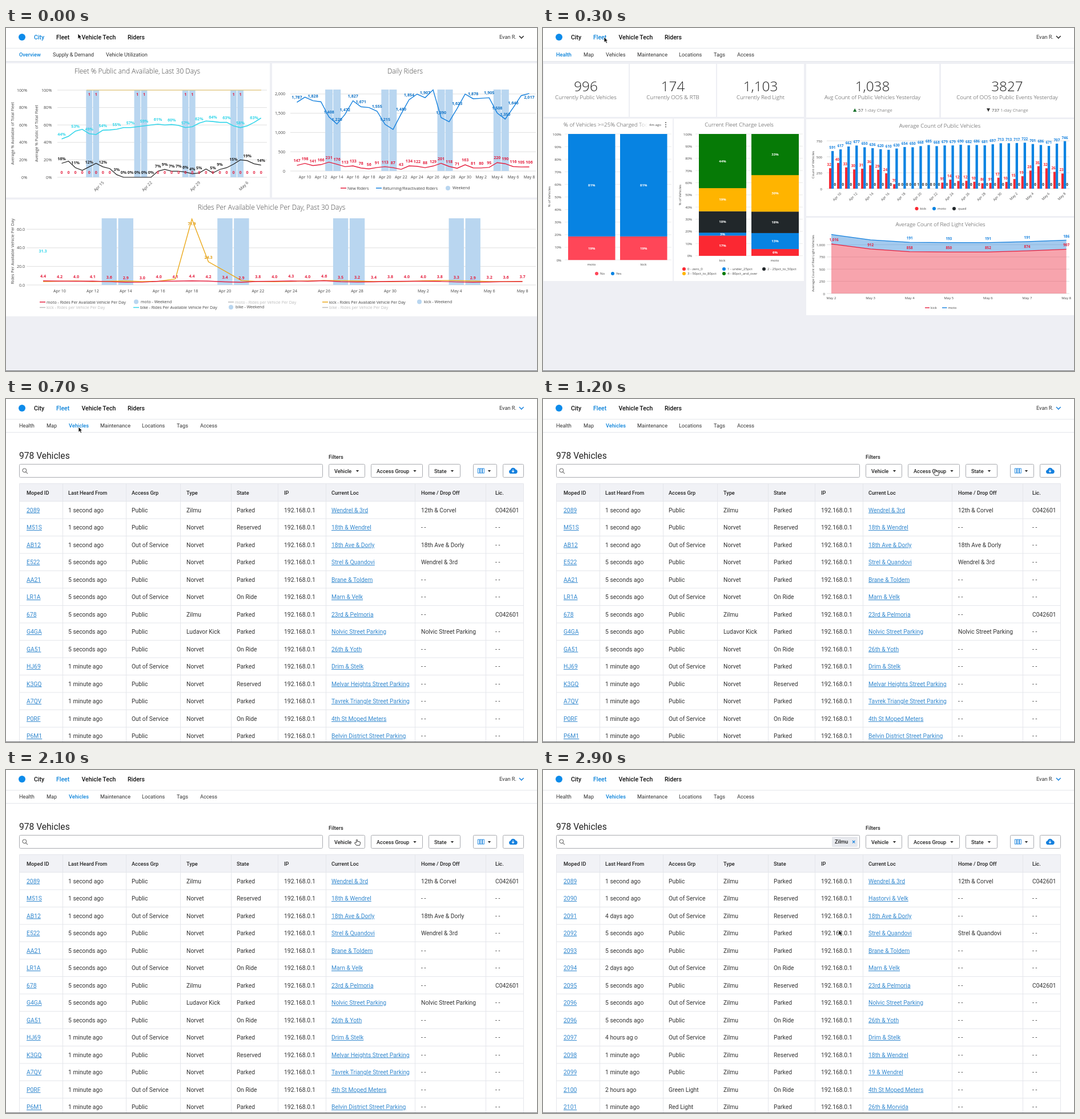
Recreate the animation shown at these times as an HTML page. Size 930x602 px, loop 3000 ms.

```html
<!DOCTYPE html>
<html lang="en">
<head>
<meta charset="utf-8">
<title>Fleet dashboard</title>
<style>
html, body { margin: 0; width: 100%; height: 100%; overflow: hidden; background: #fff; }
svg { display: block; width: 930px; height: 602px; }
text { font: 7.1px "Open Sans", sans-serif; fill: #444; white-space: pre; }
.small text { font-size: 6px; }
text.mid { text-anchor: middle; }
text.end { text-anchor: end; }
text.bold { font-weight: 700; }
text.title { font-size: 11.9px; font-weight: 300; fill: #444; }
.small text.title { font-size: 9.8px; }
.small text.big { font-size: 24.3px; font-weight: 300; fill: #222; }
.small text.delta { font-size: 7.7px; }
.small text.val { font-size: 6.3px; font-weight: 700; }
.ui text { font: 9.2px Roboto, sans-serif; fill: #333; }
.ui text.nav { font-size: 10.5px; font-weight: 500; fill: #111; }
.ui text.med { font-weight: 500; fill: #222; }
.ui text.on { font-weight: 500; fill: #0d84da; }
.ui text.cell { font-size: 10.35px; }
.ui text.link { fill: #3489cf; text-decoration: underline; }
.ui text.count { font-size: 15.6px; fill: #222; }
.city, .fleet, .table, .all, .only, .groups, .types { animation: 3s step-end infinite; }
.city { animation-name: city; }
.fleet { animation-name: fleet; }
.table { animation-name: table; }
.all { animation-name: all; }
.only { animation-name: only; }
.groups { animation-name: groups; }
.types { animation-name: types; }
@keyframes city { 0% { opacity: 1 } 10%, 100% { opacity: 0 } }
@keyframes fleet { 0% { opacity: 0 } 10% { opacity: 1 } 23.333%, 100% { opacity: 0 } }
@keyframes table { 0% { opacity: 0 } 23.333%, 100% { opacity: 1 } }
@keyframes all { 0% { opacity: 1 } 83.333%, 100% { opacity: 0 } }
@keyframes only { 0% { opacity: 0 } 83.333%, 100% { opacity: 1 } }
@keyframes groups { 0% { opacity: 0 } 50% { opacity: .95 } 53.333% { opacity: 1 } 66.667%, 100% { opacity: 0 } }
@keyframes types { 0% { opacity: 0 } 73.333% { opacity: .95 } 76.667% { opacity: 1 } 83.333%, 100% { opacity: 0 } }
</style>
</head>
<body>
<svg id="stage" viewBox="0 0 930 602"></svg>
<script>
const BLUE = '#1480de', RED = '#e5203f', CYAN = '#35d6ea', GOLD = '#eba91c', SHADE = '#b9d6f0', GREY = '#bbb';
const BAR = { red: '#fb2832', blue: '#0783e2', black: '#21272a', gold: '#ffb400', green: '#067a06' };

const esc = s => String(s).replace(/&/g, '&amp;').replace(/</g, '&lt;').replace(/>/g, '&gt;');
const text = (x, y, s, cls = '', fill = '') =>
  `<text x="${x}" y="${y}" class="${cls}"${fill && ` style="fill:${fill}"`}>${esc(s)}</text>`;
const turned = (x, y, s, angle, cls) =>
  `<text transform="translate(${x} ${y}) rotate(${angle})" class="${cls}">${esc(s)}</text>`;
const rect = (x, y, w, h, fill, more = '') => `<rect x="${x}" y="${y}" width="${w}" height="${h}" fill="${fill}" ${more}/>`;
const path = (d, stroke, width = 1, fill = 'none') => `<path d="${d}" stroke="${stroke}" stroke-width="${width}" fill="${fill}"/>`;
const dot = (x, y, r, fill) => `<circle cx="${x}" cy="${y}" r="${r}" fill="${fill}"/>`;
const each = (list, fn) => list.map(fn).join('');
const group = (cls, body) => `<g class="${cls}">${body}</g>`;
const plot = points => 'M' + points.map(p => p.map(n => n.toFixed(1)).join(' ')).join('L');

// A linear chart frame: px(index) and py(value).
const scale = (x0, dx, y0, k) => ({ px: i => x0 + i * dx, py: v => y0 - v * k });
const series = (c, values, color, width = 1.4) => path(plot(values.map((v, i) => [c.px(i), c.py(v)])), color, width);
const grid = (x1, x2, base, step, labels, right, color = '#d9d9d9') => each(labels, (s, i) => {
  const y = base - i * step;
  return path(`M${x1} ${y}H${x2}`, color, .8) + text(right, y + 2.5, s, 'end');
});
const weekends = (c, half, top, bottom) => each([4, 5, 11, 12, 18, 19, 25, 26], i =>
  rect(c.px(i) - half, top, half * 2, bottom - top, SHADE));
const dayName = i => i < 22 ? `Apr ${i + 9}` : `May ${i - 21}`;
const evenDays = Array.from({ length: 15 }, (_, i) => 2 * i + 1);
const percents = step => Array.from({ length: 100 / step + 1 }, (_, i) => i * step + '%');
const lineKey = (x, y, s, color, ink = '') => path(`M${x} ${y}h10`, color, 1.5) + text(x + 12, y + 2.5, s, '', ink);
const dotKey = (x, y, s, color, r = 3, gap = 6) => dot(x, y, r, color) + text(x + gap, y + 2.4, s);

const FLEET_TABS = [[23, 'Health'], [71, 'Map'], [110, 'Vehicles'], [165, 'Maintenance'], [238, 'Locations'], [299, 'Tags'], [340, 'Access']];
const CITY_TABS = [[23, 'Overview'], [82, 'Supply & Demand'], [175, 'Vehicle Utilization']];

function header(page, tabs, tab, arrow) {
  return group('ui', rect(0, 0, 930, 58, '#fff') + path('M0 35.5H930M0 58.5H930', '#e4e6ea') +
    dot(28, 16, 6, '#0d8bea') +
    each([[49, 'City'], [88, 'Fleet'], [132.5, 'Vehicle Tech'], [213, 'Riders']], ([x, s]) =>
      text(x, 19.7, s, 'nav', s === page ? '#0d84da' : '')) +
    text(864, 19.3, 'Evan R.') + path('M899 14l3.8 4 3.8-4', arrow, 1.5) +
    each(tabs, ([x, s]) => text(x, 50.2, s, s === tab ? 'on' : '')));
}

function cityPage() {
  const cards = rect(0, 58, 930, 544, '#eeeff4') +
    rect(0, 62, 462, 235.5, '#fff') + rect(466, 62, 464, 235.5, '#fff') + rect(0, 301, 930, 205, '#fff');

  const a = scale(97.5, 12.04, 262, 1.53);
  const open = [44, 47, 53, 55, 50, 49, 54, 54.3, 55, 57, 57, 58, 59, 60, 61, 60, 60.5, 59.5, 57, 58, 62, 64.5, 64, 63, 63, 59, 57, 59, 63, 68];
  const openTags = [44, 53, 49, 54, 55, 57, 59, 61, 60, 57, 62, 64, 63, 58, 63];
  const idle = [16, 18.5, 11, 8, 12, 16, 12, 10, 3, 0, 0, 0, 0, 0, 7, 9, 7, 7, 6, 4, 5, 9.5, 5, 9, 11, 15, 20, 19, 15.5, 14];
  const untagged = [1, 3, 5, 7, 21, 24, 26, 28];
  const share = text(230, 79.5, 'Fleet % Public and Available, Last 30 Days', 'title mid') +
    grid(90, 457, 262, 30.6, percents(20), 80) + each(percents(20), (s, i) => text(37, 264.5 - i * 30.6, s, 'end')) +
    weekends(a, 5.4, 109, 262) + path('M141 109H447', '#e6c25e', 1.2) +
    series(a, open, CYAN, 1.6) + series(a, idle, '#222', 1.2) +
    each([4, 5, 11, 12, 18, 19, 25, 26], i => text(a.px(i), 119, 1, 'mid bold', RED)) +
    each(idle, (v, i) => i < 8 || i > 13 ? text(a.px(i), 256, 0, 'mid bold', RED) : '') +
    each(openTags, (v, i) => text(a.px(2 * i), a.py(open[2 * i]) - 5.5, v + '%', 'mid bold', CYAN)) +
    each(idle, (v, i) => untagged.includes(i) ? '' : text(a.px(i), a.py(v) - 6, Math.round(v) + '%', 'mid bold', '#222')) +
    each(['Apr 15', 'Apr 22', 'Apr 29', 'May 6'], (s, i) => turned(172 + i * 84.3, 272, s, -45, 'end')) +
    turned(13.5, 185, 'Average % Available of Total Fleet', -90, 'mid') +
    turned(56, 185, 'Average % Public of Total Fleet', -90, 'mid');

  const b = scale(509.5, 14.03, 251, .0675);
  const back = [1787, 1920, 1828, 1800, 1408, 1220, 1472, 1827, 1671, 1650, 1555, 1215, 1080, 1480, 1854, 2000, 1907, 2110, 1390, 1280, 1623, 2000, 1878, 1890, 1905, 1508, 1350, 1646, 1960, 2017];
  const plain = [1, 3, 9, 12, 15, 17, 19, 21, 23, 28];
  const fresh = [147, 198, 141, 166, 231, 176, 113, 133, 78, 56, 91, 113, 87, 43, 134, 122, 88, 129, 201, 118, 71, 163, 81, 80, 95, 220, 190, 116, 105, 106];
  const riders = text(699, 79.5, 'Daily Riders', 'title mid') +
    grid(498, 928, 251, 33.8, ['0', '500', '1,000', '1,500', '2,000'], 489) + weekends(b, 6.5, 108, 251) +
    series(b, back, BLUE) + series(b, fresh, RED) +
    each(back, (v, i) => plain.includes(i) ? '' :
      text(b.px(i), b.py(v) + (i === 29 ? 9.5 : -6), v.toLocaleString('en-US'), 'mid bold', '#1173c6')) +
    each(fresh, (v, i) => text(b.px(i), b.py(v) - 5.7, v, 'mid bold', RED)) +
    each(evenDays, i => text(b.px(i), 263.5, dayName(i), 'mid')) +
    lineKey(586, 281, 'New Riders', RED) + lineKey(648, 281, 'Returning/Reactivated Riders', BLUE) +
    dotKey(774, 281, 'Weekend', SHADE, 4, 8);

  const c = scale(65, 28.95, 451, 1.63);
  const moto = [4.4, 4.2, 4, 4.1, 3.6, 2.9, 3, 4, 4.1, 4.4, 4.2, 3.4, 2.9, 3.8, 4, 4.3, 4, 4.6, 3.5, 3.2, 3.4, 3.8, 4, 4, 3.8, 3.3, 2.9, 3.2, 3.6, 3.7];
  const kick = moto.map((v, i) => ({ 8: 6.5, 9: 71, 10: 25, 11: 15, 12: 4.8 })[i] ?? (i < 8 ? 3.7 + i % 3 * .3 : 4.2 - Math.cos(i * .9) * .7));
  const rides = 'Rides Per Available Vehicle Per Day', total = 'Rides per Vehicle Per Day';
  const usage = text(465, 318.5, 'Rides Per Available Vehicle Per Day, Past 30 Days', 'title mid') +
    grid(36, 928, 451, 32.6, ['0.0', '20.0', '40.0', '60.0'], 33) + weekends(c, 13.2, 334, 451) +
    series(c, kick, GOLD) + series(c, moto, RED) +
    each(moto, (v, i) => text(c.px(i), c.py(v) - 5.5, v.toFixed(1), 'mid bold', RED)) +
    text(325.5, 345.5, '71.9', 'mid bold', '#e09c10') + text(354.5, 405, '24.3', 'mid bold', '#e09c10') +
    text(64.5, 393.5, '31.3', 'mid bold', CYAN) +
    each(evenDays, i => text(c.px(i), 463.5, dayName(i), 'mid')) + turned(14, 392, rides, -90, 'mid') +
    lineKey(59, 481, 'moto - ' + rides, RED) + dotKey(228, 480.5, 'moto - Weekend', SHADE, 4, 8) +
    lineKey(389, 481, 'moto - ' + total, GREY, GREY) + lineKey(554, 481, 'kick - ' + rides, GOLD) +
    dotKey(724, 480.5, 'kick - Weekend', SHADE, 4, 8) +
    lineKey(59, 490.5, 'kick - ' + total, GREY, GREY) + lineKey(223, 490.5, 'bike - ' + rides, CYAN) +
    dotKey(394, 490, 'bike - Weekend', SHADE, 4, 8) + lineKey(554, 490.5, 'bike - ' + total, GREY, GREY);

  return group('city', cards + header('City', CITY_TABS, 'Overview', '#222') + share + riders + usage);
}

// Parts run from the bottom up: [size, label, colour].
function stack(x, w, bottom, k, parts) {
  let y = bottom;
  return each(parts, ([size, label, color]) => {
    y -= size * k;
    return rect(x, y, w, size * k + .2, color) + text(x + w / 2, y + size * k / 2 + 2.2, label + '%', 'mid bold', '#fff');
  });
}

function fleetPage() {
  const cards = rect(0, 58, 930, 544, '#eeeff4') + each([
    [1, 63, 149, 93], [152, 63, 151, 93], [305, 63, 152, 93], [461, 63, 233, 94], [697, 63, 233, 94],
    [1, 159, 226, 285], [229, 159, 228, 285], [461, 160, 469, 170], [461, 333, 469, 171]
  ], ([x, y, w, h]) => rect(x, y, w, h, '#fff'));

  const totals = each([
    [75, '996', 'Currently Public Vehicles'], [227.5, '174', 'Currently OOS & RTB'], [381, '1,103', 'Currently Red Light'],
    [577, '1,038', 'Avg Count of Public Vehicles Yesterday'], [813, '3827', 'Count of OOS to Public Events Yesterday']
  ], ([x, n, s]) => text(x, 111, n, 'big mid') + text(x, 125, s, 'title mid')) +
    path('M543 147l3.2-6 3.2 6z', 'none', 0, '#19712c') + text(552, 147, '57', 'delta') + text(563, 147, '1-day Change', 'delta', '#888') +
    path('M777 141h6l-3 6z', 'none', 0, '#333') + text(786, 147, '737', 'delta') + text(801, 147, '1-day Change', 'delta', '#888');

  const rose = '#ff4658';
  const charged = text(36, 173.2, '% of Vehicles >=25% Charged Toc', 'title') + rect(162, 162, 22, 16, 'url(#fade)') +
    rect(184, 162, 40, 16, '#fff') + text(186, 172, '4m ago') + each([166, 169.7, 173.4], y => dot(215, y, .9, '#444')) +
    grid(38, 225, 407, 22.1, percents(10), 32, '#e6e6e6') +
    each([44, 135], x => stack(x, 82.5, 407, 2.21, [[18.7, 19, rose], [81.3, 81, BAR.blue]])) +
    text(85, 417, 'moto', 'mid') + text(176, 417, 'kick', 'mid') + turned(13, 296, '% of Vehicles', -90, 'mid') +
    dotKey(94, 431, 'No', rose) + dotKey(122, 431, 'Yes', BAR.blue);

  const { red, blue, black, gold, green } = BAR;
  const levels = text(343.5, 173.2, 'Current Fleet Charge Levels', 'title mid') +
    grid(267, 455, 399.7, 21.37, percents(10), 261, '#e6e6e6') +
    stack(273, 83, 399.7, 2.137, [[16.6, 17, red], [2.4, 3, blue], [17.6, 18, black], [19, 19, gold], [44.4, 44, green]]) +
    stack(365, 83, 399.7, 2.137, [[5.6, 6, red], [13.1, 13, blue], [17.6, 18, black], [30, 30, gold], [33.7, 33, green]]) +
    text(314, 410, 'kick', 'mid') + text(406, 410, 'moto', 'mid') + turned(242, 293, '% of Vehicles', -90, 'mid') +
    dotKey(247, 423, '0 - zero_0', red) + dotKey(317, 423, '1 - under_25pct', blue) + dotKey(387, 423, '2 - 25pct_to_50pct', black) +
    dotKey(247, 431, '3 - 50pct_to_80pct', gold) + dotKey(317, 431, '4 - 80pct_and_over', green);

  const c = scale(507, 14.03, 282, .1118);
  const moto = [591, 617, 662, 677, 650, 636, 620, 610, 630, 654, 650, 668, 685, 668, 679, 679, 690, 682, 686, 681, 697, 713, 713, 717, 722, 701, 686, 671, 707, 746];
  const kick = [321, 404, 334, 302, 314, 368, 296, 241, 70, 0, 0, 1, 0, 0, 95, 142, 121, 123, 109, 86, 91, 172, 106, 151, 196, 284, 353, 320, 264, 238];
  const counts = text(695, 174.5, 'Average Count of Public Vehicles', 'title mid') +
    grid(497, 922, 282, 28, ['0', '250', '500', '750'], 489) +
    each(kick, (v, i) => rect(c.px(i) - 6, c.py(v), 4.1, v * .1118, red) + text(c.px(i) - 4, Math.min(c.py(v) - 4, 277.3), v, 'val mid', v > 1 ? red : '#333')) +
    each(moto, (v, i) => rect(c.px(i) - 2, c.py(v), 4.3, v * .1118, blue) + text(c.px(i), c.py(v) - 4, v, 'val mid', BLUE) + text(c.px(i) + 4.2, 277.3, 0, 'val mid', '#222')) +
    each(evenDays, i => turned(c.px(i) + 2, 291, dayName(i), -45, 'end')) + turned(475, 240, 'Count of Vehicles', -90, 'mid') +
    dotKey(654.5, 317, 'kick', red) + dotKey(685, 317, 'moto', blue) + dotKey(720, 317, 'quad', black, 3, 7);

  const d = scale(505, 68.6, 466, .0856);
  const low = [1016, 912, 858, 850, 852, 874, 907], extra = [194, 189, 191, 193, 191, 191, 186];
  const points = list => list.map((v, i) => [d.px(i), d.py(v)]);
  const base = points(low), top = points(low.map((v, i) => v + extra[i]));
  const lights = text(696, 348, 'Average Count of Red Light Vehicles', 'title mid') +
    grid(497, 922, 466, 21.4, ['0', '250', '500', '750', '1,000'], 494) +
    path(plot([...top, ...base.slice().reverse()]) + 'z', 'none', 0, 'rgba(74,150,222,.5)') +
    path(plot([...base, [d.px(6), 466], [d.px(0), 466]]) + 'z', 'none', 0, 'rgba(240,75,93,.5)') +
    path(plot(top), BLUE, 1.3) + path(plot(base), RED, 1.3) +
    each(low, (v, i) => text(d.px(i) + (i ? 0 : 4.5), d.py(v) - 5, v.toLocaleString('en-US'), 'val mid', RED)) +
    each(extra, (v, i) => i > 1 ? text(d.px(i), top[i][1] - 4.8, v, 'val mid', BLUE) : '') +
    each(low, (v, i) => text(d.px(i), 476, `May ${i + 2}`, 'mid')) +
    turned(475, 413, 'Average Count of Red Light Vehicles', -90, 'mid') +
    path('M669 491h8', RED, 1.4) + text(679, 493, 'kick') + path('M699 491h8.5', BLUE, 1.4) + text(709.5, 493, 'moto');

  return group('fleet', cards + header('Fleet', FLEET_TABS, 'Health', '#222') +
    group('small', totals + charged + levels + counts + lights));
}

const COLUMNS = [36, 109, 220, 316, 404, 487, 570, 727, 857];
const WORDS = { P: 'Public', O: 'Out of Service', Z: 'Zilmu', N: 'Norvet', K: 'Ludavor Kick', p: 'Parked', r: 'Reserved', o: 'On Ride', s1: '1 second ago', s5: '5 seconds ago', m1: '1 minute ago' };
const PLATE = 'C042601', NONE = '- -';

// Row fields: id | heard | group | type | state | location | home | plate
const EVERY = `2089|s1|P|Z|p|Wendrel & 3rd|12th & Corvel|${PLATE}
M51S|s1|P|N|r|18th & Wendrel
AB12|s1|O|N|p|18th Ave & Dorly|18th Ave & Dorly
E522|s5|P|N|p|Strel & Quandovi|Wendrel & 3rd
AA21|s5|P|N|p|Brane & Toldem
LR1A|s5|O|N|o|Marn & Velk
678|s5|P|Z|p|23rd & Pelmoria||${PLATE}
G4GA|s5|P|K|p|Nolvic Street Parking|Nolvic Street Parking
GA51|s5|P|N|o|26th & Yoth
HJ69|m1|O|N|p|Drim & Stelk
K3GQ|m1|P|N|r|Melvar Heights Street Parking
A7QV|m1|P|N|p|Tavrek Triangle Street Parking
P0RF|m1|O|N|o|4th St Moped Meters
P6M1|m1|P|N|p|Belvin District Street Parking`;
const FILTERED = `2089|s1|P|Z|p|Wendrel & 3rd|12th & Corvel|${PLATE}
2090|s1|O|Z|r|Hastorvi & Velk
2091|4 days ago|O|Z|r|18th Ave & Dorly
2092|s5|P|Z|p|Strel & Quandovi|Strel & Quandovi
2093|s5|P|Z|p|Brane & Toldem
2094|2 days ago|O|Z|o|Marn & Velk
2095|s5|P|Z|r|23rd & Pelmoria||${PLATE}
2096|s5|O|Z|p|Nolvic Street Parking
2096|s5|P|Z|o|26th & Yoth
2097|4 hours ag o|O|Z|p|Drim & Stelk
2098|m1|P|Z|r|18th & Wendrel
2099|m1|P|Z|p|19 & Wendrel
2100|2 hours ago|Green Light|Z|o|4th St Moped Meters
2101|m1|Red Light|Z|p|26th & Morvida`;

const rows = data => each(data.split('\n'), (row, r) => {
  const [id, heard, grp, type, state, loc, home, plate] = row.split('|');
  return each([id, heard, grp, type, state, '192.168.0.1', loc, home || NONE, plate || NONE], (s, i) =>
    text(COLUMNS[i], 198.6 + r * 30.5, WORDS[s] || s, i === 0 || i === 6 ? 'cell link' : 'cell'));
});

const menu = (cls, x, h, items, bar) => group(cls,
  rect(x, 138, 169.5, h, '#fff', 'rx="2" style="filter:drop-shadow(0 1px 2px rgba(0,0,0,.3))"') +
  each(items, (s, i) => text(x + 15, 162 + i * 21.4, s, '', '#222')) + (bar ? rect(x + 163, 152, 3.6, 93, '#aaa', 'rx="1.5"') : ''));

function tablePage() {
  const box = (x, w) => rect(x + .5, 114.5, w, 23, '#fff', 'rx="2" stroke="#a9abb0"');
  const button = (x, w, s, caret) => box(x, w) + text(x + 10, 129.5, s, 'med') + path(`M${caret - 2.7} 125h5.4l-2.7 3z`, 'none', 0, '#222');
  const tools = text(23, 105, '978 Vehicles', 'count') + text(565, 104.8, 'Filters', 'med') + box(23, 531) +
    path('M35 128.2l3 3M35.6 125.3a3.3 3.3 0 1 1-6.6 0a3.3 3.3 0 1 1 6.6 0', '#777', 1.2) +
    button(565, 63, 'Vehicle', 615.5) + button(639, 90, 'Access Group', 716) + button(740, 55, 'State', 781.5) + button(818, 41, '', 846.5) +
    each([826.5, 830.5, 834.5], x => rect(x, 122, 2.8, 8, 'none', `stroke="${BLUE}" stroke-width=".9"`)) + box(870, 36) +
    path('M884 131a3.4 3.4 0 0 1-.3-6.7a4.8 4.8 0 0 1 9-.6a3.7 3.7 0 0 1-.2 7.3z', 'none', 0, BLUE) +
    path('M888 123.5v4.5m-2-1.6l2 2l2-2', '#fff', 1.1);
  const frame = rect(23.5, 148.5, 883, 31, '#f1f2f6') +
    path('M23.5 602V148.5H906.5V602' + each([99, 210, 305, 394, 476, 560, 716, 840], x => `M${x + .5} 148.5V602`) +
      each([...Array(14).keys()], i => `M23.5 ${179.5 + i * 30.5}H906.5`), '#e4e6eb') +
    each(['Moped ID', 'Last Heard From', 'Access Grp', 'Type', 'State', 'IP', 'Current Loc', 'Home / Drop Off', 'Lic.'], (s, i) =>
      text(COLUMNS[i], 168.4, s, 'med'));
  const chip = rect(506, 117, 45, 18, '#e7e9ee', 'rx="2"') + text(511, 129.3, WORDS.Z, 'med') + path('M542 124l4.4 4.4m0-4.4l-4.4 4.4', BLUE, 1.1);
  const groups = ['Public', 'Out of Service', '[OOS] Red Light', '[OOS I] Green Light', '[OOS] For Review', '[OOS] R&D', '[OOS I] Alpha'];
  return group('table', rect(0, 58, 930, 544, '#fff') + header('Fleet', FLEET_TABS, 'Vehicles', BLUE) +
    group('ui', tools + frame + group('all', rows(EVERY)) + group('only', rows(FILTERED) + chip) +
      menu('groups', 559.5, 155, groups, true) + menu('types', 565, 78, [WORDS.Z, WORDS.N, WORDS.K])));
}

// Pointer stops: time in ms, x, y, and whether it is a hand.
const STOPS = [
  [0, 126, 10], [100, 117, 13], [200, 108, 17, 1], [300, 107, 16], [500, 114, 30], [600, 127, 50, 1], [700, 127, 49],
  [800, 230, 66], [900, 410, 94], [1000, 570, 117], [1100, 655, 124, 1], [1200, 688, 124, 1], [1300, 705, 123, 1], [1500, 706, 123],
  [1700, 685, 146], [1800, 655, 160], [1900, 628, 143], [2000, 615, 122, 1], [2200, 614, 122], [2300, 602, 145],
  [2400, 592, 157, 1], [2500, 588, 160], [2600, 562, 205], [2700, 538, 248], [2800, 523, 274], [2900, 518, 281]
];
const frames = (name, css) => `@keyframes ${name}{${each(STOPS, s => `${(s[0] / 30).toFixed(3)}%{${css(s)}}`)}}`;
const pointerCss = frames('move', ([, x, y]) => `transform:translate(${x}px,${y}px)`) +
  frames('arrow', s => `opacity:${s[3] ? 0 : 1}`) + frames('hand', s => `opacity:${s[3] ? 1 : 0}`) +
  each(['move', 'arrow', 'hand'], n => `.${n}{animation:${n} 3s step-end infinite}`);
const pointer = group('move',
  group('arrow', path('M0 0V9.2L2.2 7.2L3.8 10.8L5.5 10L3.9 6.6H6.6z', '#fff', .7, '#111')) +
  group('hand', path('M-1.5 5.5V.6q1-1.2 2 0V3.5q1-.7 1.8.2q1-.5 1.7.3q1.3-.2 1.4 1V7.500q-.4 1.300-1 2.700H-1.300L-4.500 6.200q.1-1.300 1.400-.8z', '#222', .9, '#fff')));

document.head.insertAdjacentHTML('beforeend', `<style>${pointerCss}</style>`);
document.getElementById('stage').innerHTML =
  '<defs><linearGradient id="fade"><stop stop-color="#fff" stop-opacity="0"/><stop offset="1" stop-color="#fff"/></linearGradient></defs>' +
  cityPage() + fleetPage() + tablePage() + rect(0, 601, 930, 1, '#77797d') + pointer;
</script>
</body>
</html>
```
